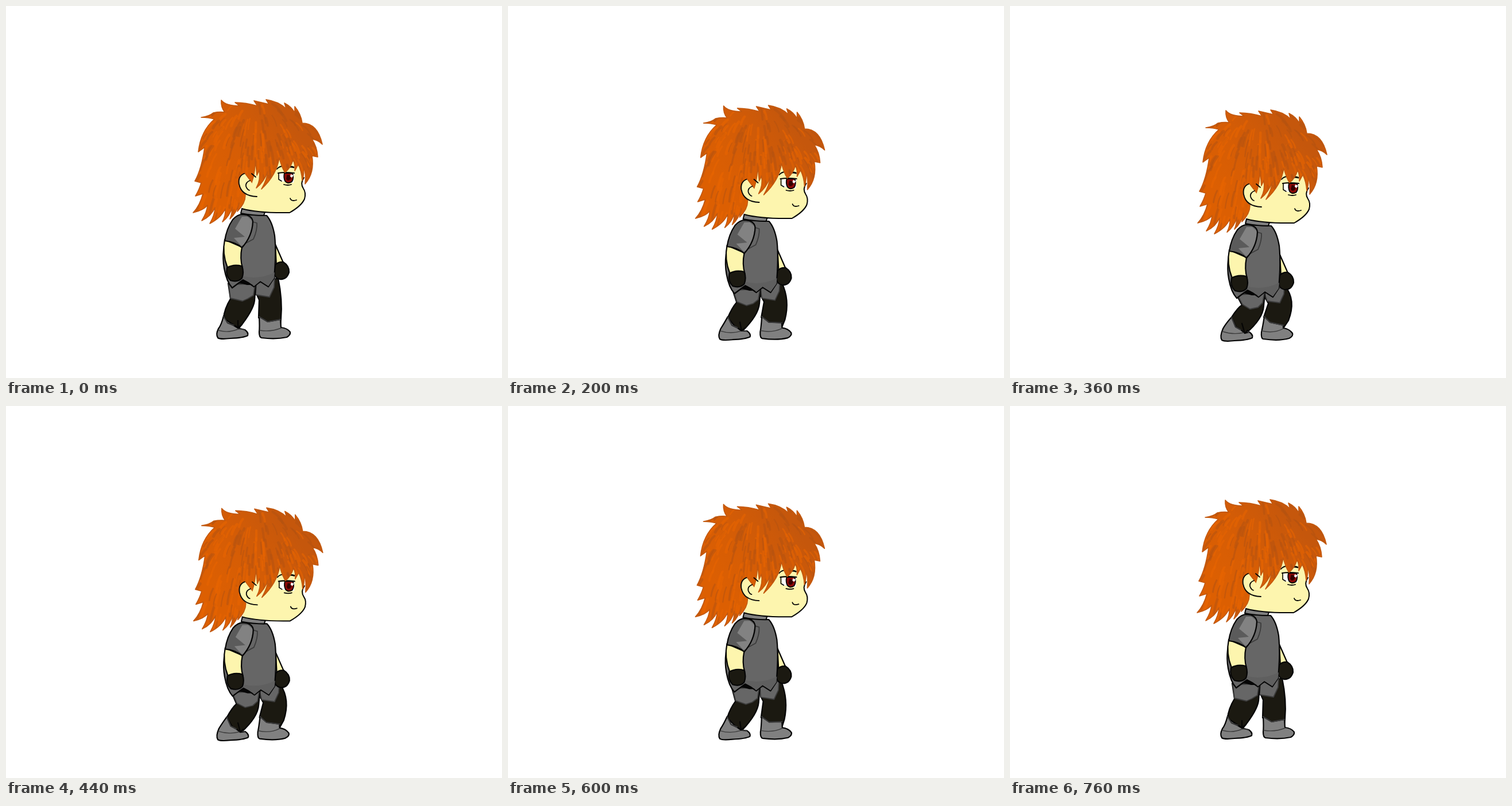
Write an HTML page with a canvas that moves like this. It is 864x648 px and loops after 0.8 s.

```html
<!DOCTYPE html>
<html lang="en">
<head>
<meta charset="utf-8">
<title>Idle character</title>
<style>
html, body { margin: 0; height: 100%; overflow: hidden; background: #fff; }
canvas { display: block; }
</style>
</head>
<body>
<canvas id="stage" width="864" height="648"></canvas>
<script>
const ctx = document.getElementById('stage').getContext('2d');
const STEP = 40, STEPS = 20, LOWEST = 9;
const INK = '#050505', SKIN = '#fdf5ae', BLACK = '#1b1911', GREY = '#666', LIGHT = '#808080', SEAM = '#3c3c3c';

// Leg parts: standing pose, crouched pose, fill, stroke, width
const legs = [
  // far leg
  ['M436 484L437 503L441 512L440 543L455 553L478 557L479 545Q482 512 474 474Z',
   'M442 500L444 508L450 518L442 542L452 553L477 560L485 548Q499 512 479 488Z', BLACK, INK, 2.2],
  ['M436 484L468 473L467 490L459 507L435 503Z',
   'M443 500L478 488L477 502L470 517L448 514Z', GREY, SEAM, 1.8],
  ['M441 541Q442 560 441 568Q441 577 445 578Q470 581 489 577Q496 573 495 568Q490 561 479 560L478 546L456 550Z',
   'M443 541Q440 560 438 568Q437 579 441 580Q468 584 486 579Q494 575 492 570Q486 562 476 561L476 556L453 551Z', LIGHT, INK, 2.2],
  ['M442 565Q462 568 479 561', 'M439 566Q459 571 476 562', null, SEAM, 1.4],
  ['M441 541L456 550L478 546', 'M443 541L453 551L476 556', null, SEAM, 1.8],
  // near leg
  ['M387 483L391 510Q380 528 379 544L397 556L406 561Q431 530 433 513L435 484Z',
   'M394 502L404 521Q397 525 386 542L394 560L410 571Q441 545 442 522L444 500Z', BLACK, INK, 2.2],
  ['M388 485L434 484L431 504L421 510L412 514L391 509Z',
   'M396 503L443 500L440 517L432 525L418 528L405 520Z', GREY, SEAM, 1.8],
  ['M379 540Q375 556 370 562Q365 572 369 578Q373 581 391 579Q414 578 421 574Q423 569 416 564L404 561L396 556L386 552Z',
   'M386 542Q376 553 371 562Q365 576 369 582Q374 585 391 583Q414 582 422 578Q424 573 417 568L409 570L402 564L393 559Z', LIGHT, INK, 2.2],
  ['M370 565Q387 570 404 563Q411 562 416 565', 'M370 567Q388 573 407 569Q413 566 417 569', null, SEAM, 1.4],
  ['M379 541L386 552L397 556', 'M386 542L393 559L402 564', null, SEAM, 1.8],
  ['M404 548L404 560L411 555', 'M404 553L409 570L414 565', null, INK, 2.2]
].map(([from, to, ...style]) => [from, to.match(/\d+/g), ...style]);

const sleeve = 'M412 363Q429 364 430 376Q429 401 411 421Q400 411 381 409Q384 388 395 372Q403 363 412 363Z';

const body = [
  // far arm
  ['M469 415L483 447L471 453Z', SKIN, INK, 2.2],
  ['M483 446Q494 453 493 464Q489 477 477 476Q468 474 467 465L469 451Q475 445 483 446Z', BLACK, INK, 2.2],
  // shirt
  ['M411 363Q397 366 389 384Q374 425 380 457Q384 480 394 491L406 482L413 477L422 482L432 489L443 480L457 489L467 474Q471 430 468 400Q464 376 454 365Z', GREY, INK, 2.2],
  ['M411 470Q440 478 468 464L467 474L457 488L443 479L432 488L422 480L411 475Z', '#5f5f5f'],
  ['M405 482L413 477L430 486L420 486Z', INK],
  ['M411 353L451 359L449 365Q430 365 409 361Z', LIGHT, INK, 2],
  ['M430 376L437 378Q438 390 431 406L418 413', null, SEAM, 1.8],
  // near arm
  ['M381 407Q376 431 386 456L412 456Q407 440 411 420Z', SKIN, INK, 2.2],
  ['M385 456Q396 449 411 453Q415 464 411 474Q404 482 391 478Q382 470 385 456Z', BLACK, INK, 2.2],
  [sleeve, '#5b5b5b'],
  ['M411 367L421 367L429 374Q428 398 414 416L410 418L397 404L416 402L399 388Z', '#828282'],
  [sleeve, null, INK, 2.2]
];

const profile = 'M519 299Q512 309 518 318Q523 325 520 336Q515 348 494 360Q440 361 411 353';

const face = [
  ['M400 351L402 347L406 353Z', INK],
  [profile + 'L417 329Q404 322 406 304Q409 291 416 291L414 255L520 255Z', SKIN],
  [profile, null, INK, 2],
  ['M476 292L502 292L501 308L477 305Z', '#fff'],
  ['M485 291L499 291Q502 300 498 306Q491 311 486 305Q483 298 485 291Z', '#8b0707', INK, 1.8],
  ['M490 294Q497 294 496 301Q491 307 488 301Z', '#300'],
  ['M496 293L501 295L498 299L495 297Z', '#fff'],
  ['M474 291Q486 289 502 291', null, INK, 2.2],
  ['M475 292L475 302L480 305', null, INK, 1.6],
  ['M484 311Q491 313 497 311', null, INK, 1.8],
  ['M472 284Q476 279 483 279', null, INK, 1.8],
  ['M491 281Q496 279 501 281', null, INK, 2.8],
  ['M495 335Q497 341 506 338', null, INK, 1.8]
];

const ear = [
  ['M415 292Q404 296 406 310Q410 331 437 332L428 308Z', SKIN],
  ['M415 292Q404 296 406 310Q410 331 437 332', null, INK, 1.8],
  ['M425 304Q417 307 418 314Q420 320 424 321', null, INK, 1.8],
  ['M428 292L435 298', null, INK, 1.8]
];

const hair = new Path2D(
  'M340 194Q354 192 361 186Q371 184 381 185Q374 176 375 164Q383 174 407 174L399 168Q418 168 438 174L432 165L458 171L453 163' +
  'Q475 166 488 179L485 169Q497 175 503 186L503 175Q514 188 516 204Q543 204 551 241Q543 233 533 232Q542 245 543 263L533 261' +
  'Q538 291 521 310Q523 291 518 278Q520 292 516 304Q515 288 509 276L503 287Q504 276 500 268Q496 282 486 290Q480 281 476 264' +
  'Q472 294 445 319Q455 301 456 288Q450 306 436 317Q444 302 441 286L437 295L434 264Q435 288 428 308L416 291Q409 292 407 303' +
  'Q404 319 417 329Q417 344 403 358L406 343Q402 360 390 371Q394 361 394 350Q390 366 377 376Q383 364 382 353Q375 369 355 379' +
  'Q364 363 364 351Q358 366 341 374Q350 359 351 347Q344 356 326 360Q338 347 343 327L330 331Q337 319 340 308L329 305' +
  'Q341 283 346 246L335 254Q339 218 363 197Q353 194 340 194Z');

let seed = 11;
const random = () => (seed = seed * 16807 % 2147483647) / 2147483647;

// Locks fan out from the crown and droop
const strands = Array.from({ length: 300 }, (_, i) => {
  const x = 326 + random() * 224, y = 165 + random() * 208;
  const dx = x - 436, dy = y - 150, size = Math.hypot(dx, dy) || 1;
  const len = 12 + random() * 22, ux = dx / size * len * .65, uy = dy / size * len;
  const path = new Path2D();
  path.moveTo(x, y);
  path.quadraticCurveTo(x + ux * .7, y + uy * .4, x + ux, y + uy);
  return { path, color: i % 2 ? 'rgba(180,82,18,.55)' : 'rgba(232,101,0,.6)', width: 2 + random() * 3 };
});

const hairFill = ctx.createLinearGradient(350, 290, 490, 190);
hairFill.addColorStop(0, '#dc5f02');
hairFill.addColorStop(.4, '#d65d05');
hairFill.addColorStop(1, '#c5570c');

function paint([d, fill, stroke, width]) {
  const path = new Path2D(d);
  if (fill) { ctx.fillStyle = fill; ctx.fill(path); }
  if (stroke) { ctx.strokeStyle = stroke; ctx.lineWidth = width; ctx.stroke(path); }
}

function paintLeg([from, to, ...style], k) {
  let i = 0;
  paint([from.replace(/\d+/g, n => (+n + (to[i++] - n) * k).toFixed(2)), ...style]);
}

function paintHair() {
  ctx.save();
  ctx.fillStyle = hairFill;
  ctx.fill(hair);
  ctx.clip(hair);
  for (const s of strands) {
    ctx.strokeStyle = s.color;
    ctx.lineWidth = s.width;
    ctx.stroke(s.path);
  }
  ctx.restore();
  ctx.strokeStyle = '#c2580e';
  ctx.lineWidth = 1.6;
  ctx.stroke(hair);
}

function draw(now) {
  const step = Math.floor(now / STEP) % STEPS;
  const k = step <= LOWEST ? step / LOWEST : (STEPS - 1 - step) / (STEPS - 1 - LOWEST);
  ctx.fillStyle = '#fff';
  ctx.fillRect(0, 0, 864, 648);
  ctx.lineJoin = ctx.lineCap = 'round';
  legs.forEach(part => paintLeg(part, k));
  ctx.save();
  ctx.translate(k, 18 * k);
  body.forEach(paint);
  face.forEach(paint);
  paintHair();
  ear.forEach(paint);
  ctx.restore();
  requestAnimationFrame(draw);
}
requestAnimationFrame(draw);
</script>
</body>
</html>
```
